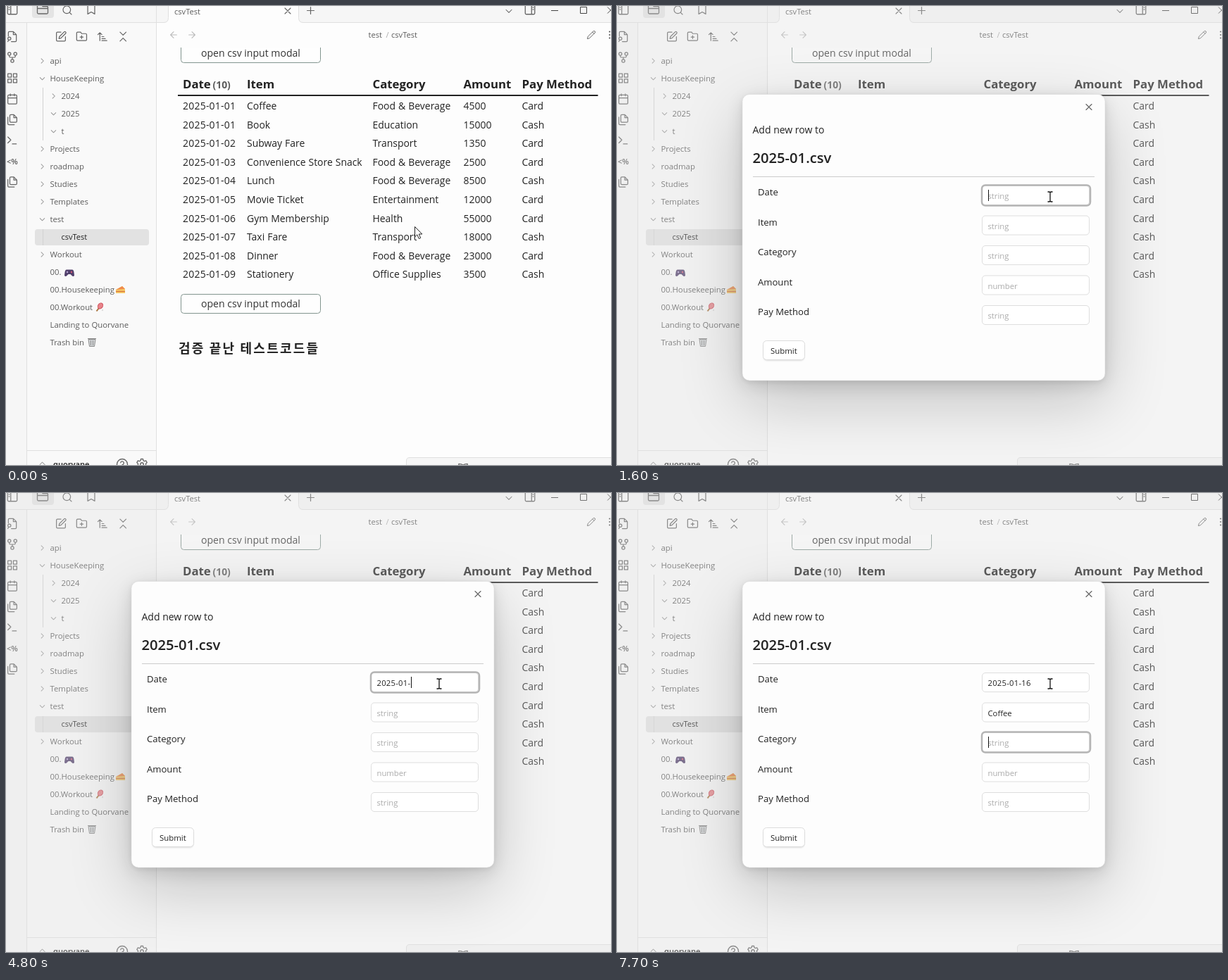
Write an HTML page that moves like this. It is 859 by 652 pixels and loops after 8 s.

```html
<!DOCTYPE html>
<html lang="en">
<head>
<meta charset="utf-8">
<title>CSV input modal</title>
<style>
html, body { margin: 0; width: 100%; height: 100%; overflow: hidden; background: #fdfdfd; }
svg { display: block; width: 859px; height: 652px; }
text { font-family: "Open Sans", "Noto Sans", sans-serif; fill: #222; white-space: pre; }
.side { font-size: 11.35px; fill: #5c5c5c; }
.nav { font-size: 11.1px; fill: #5c5c5c; }
.cell { font-size: 13.95px; word-spacing: .4px; }
.date { font-size: 13.95px; letter-spacing: .25px; }
.head { font-size: 16.8px; font-weight: 700; }
.count { font-size: 13.9px; font-weight: 700; fill: #5c5c5c; }
.btn { font-size: 14.05px; fill: #333; }
.title { font: 700 18px "Noto Sans CJK KR", "Noto Sans CJK", sans-serif; letter-spacing: 2.2px; }
.lead { font-size: 14px; font-weight: 500; }
.file { font-size: 20.2px; font-weight: 600; }
.label { font-size: 13.1px; }
.input { font-size: 11.25px; }
.submit { font-size: 11.4px; }
.icon { fill: none; stroke: #666; stroke-width: 1.75; stroke-linecap: round; stroke-linejoin: round; }
.line { fill: none; stroke: #e0e0e0; }
</style>
</head>
<body>
<svg id="stage" viewBox="0 0 859 652" xmlns="http://www.w3.org/2000/svg"></svg>
<script>
const stage = document.getElementById('stage');
const LOOP = 8000, STEP = 100, OPEN = 600;

const text = (x, y, cls, s, extra = '') => `<text x="${x}" y="${Math.round(y)}" class="${cls}" ${extra}>${s}</text>`;
const rect = (x, y, w, h, fill, extra = '') => `<rect x="${x}" y="${y}" width="${w}" height="${h}" fill="${fill}" ${extra}/>`;
const line = (d, extra = '') => `<path class="line" d="${d}" ${extra}/>`;
const icon = (x, y, d, size = 16, extra = '') =>
  `<path class="icon" transform="translate(${x - size / 2} ${y - size / 2}) scale(${size / 24})" d="${d}" ${extra}/>`;

// Icon outlines on a 24-unit grid
const I = {
  panel: 'M5 3h14a2 2 0 0 1 2 2v14a2 2 0 0 1-2 2H5a2 2 0 0 1-2-2V5a2 2 0 0 1 2-2zM9 3v18M5.5 8h1M5.5 12h1',
  panelRight: 'M5 3h14a2 2 0 0 1 2 2v14a2 2 0 0 1-2 2H5a2 2 0 0 1-2-2V5a2 2 0 0 1 2-2zM15 3v18M17.5 8h1M17.5 12h1',
  folder: 'M4 20h16a2 2 0 0 0 2-2V8a2 2 0 0 0-2-2h-8l-2-3H4a2 2 0 0 0-2 2v13a2 2 0 0 0 2 2zM2 10h20',
  folderPlus: 'M4 20h16a2 2 0 0 0 2-2V8a2 2 0 0 0-2-2h-8l-2-3H4a2 2 0 0 0-2 2v13a2 2 0 0 0 2 2zM12 10v6M9 13h6',
  search: 'M19 11a8 8 0 1 1-16 0a8 8 0 1 1 16 0M21 21l-4.3-4.3',
  bookmark: 'M19 21l-7-4-7 4V5a2 2 0 0 1 2-2h10a2 2 0 0 1 2 2z',
  edit: 'M12 3H5a2 2 0 0 0-2 2v14a2 2 0 0 0 2 2h14a2 2 0 0 0 2-2v-7M18.4 2.6a2.1 2.1 0 0 1 3 3L12 15l-4 1 1-4z',
  pencil: 'M17 3a2.8 2.8 0 1 1 4 4L7.5 20.5 2 22l1.5-5.5zM15 5l4 4',
  sort: 'M3 8l4-4 4 4M7 4v16M11 12h4M11 16h7M11 20h10',
  collapse: 'M6 3l6 6 6-6M6 21l6-6 6 6',
  fileSearch: 'M14 2v6h6M4 11V4a2 2 0 0 1 2-2h8l6 6v12a2 2 0 0 1-2 2H10M9 16a3 3 0 1 1-6 0a3 3 0 1 1 6 0M3 22l1.5-3',
  fork: 'M9 5a3 3 0 1 1-6 0a3 3 0 1 1 6 0M21 5a3 3 0 1 1-6 0a3 3 0 1 1 6 0M15 19a3 3 0 1 1-6 0a3 3 0 1 1 6 0M18 8v2q0 2-2 2H8q-2 0-2-2V8M12 12v4',
  grid: 'M3 3h7v7H3zM14 3h7v7h-7zM14 14h7v7h-7zM3 14h7v7H3z',
  calendar: 'M5 4h14a2 2 0 0 1 2 2v14a2 2 0 0 1-2 2H5a2 2 0 0 1-2-2V6a2 2 0 0 1 2-2zM3 10h18M8 2v4M16 2v4',
  copy: 'M15 2H9a2 2 0 0 0-2 2v11a2 2 0 0 0 2 2h10a2 2 0 0 0 2-2V8zM15 2v6h6M3 7v13a2 2 0 0 0 2 2h11',
  terminal: 'M3 17l6-6-6-6M12 19h8',
  help: 'M22 12a10 10 0 1 1-20 0a10 10 0 1 1 20 0M9 9a3 3 0 0 1 6 1c0 2-3 3-3 3M12 17v.1',
  gear: 'M15 12a3 3 0 1 1-6 0a3 3 0 1 1 6 0M10 2h4l.6 3 2.2 1.2 2.8-1 2 3.5-2.2 2v2.6l2.2 2-2 3.5-2.8-1-2.2 1.2L14 22h-4l-.6-3-2.2-1.2-2.8 1-2-3.5 2.2-2v-2.6l-2.2-2 2-3.5 2.8 1L9.4 5z',
  book: 'M12 7v14M12 6c-2-2-5-3-10-3v15c5 0 8 1 10 3 2-2 5-3 10-3V3c-5 0-8 1-10 3z',
  x: 'M18 6L6 18M6 6l12 12',
  plus: 'M5 12h14M12 5v14',
  left: 'M12 19l-7-7 7-7M19 12H5',
  right: 'M12 5l7 7-7 7M5 12h14',
  open: 'M5 9l7 7 7-7',
  closed: 'M9 5l7 7-7 7',
  up: 'M5 15l7-7 7 7'
};

function chrome() {
  const ribbon = ['fileSearch', 'fork', 'grid', 'calendar', 'copy', 'terminal', '', 'copy'];
  return rect(0, 0, 859, 652, '#fdfdfd') + rect(0, 0, 859, 24, '#f6f6f6') +
    rect(0, 24, 30, 628, '#f6f6f6') + rect(30, 24, 184, 628, '#f9f9f9') +
    line('M0 23.5H224M422 23.5H859M29.5 24V652M213.5 0V652M30 631.5H213') +
    '<path d="M224 24q6.5-.5 6.5-7V-2H415.5V17q0 6.5 6.5 7z" fill="#fdfdfd"/>' +
    line('M224 23.5q6.5 0 6.5-7V-2M415.5-2V16.5q0 7 6.5 7') +
    rect(37, -8, 31, 25, '#e4e4e4', 'rx="4"') +
    icon(9, 5, I.panel, 18) + icon(52, 5, I.folder, 18) + icon(87, 6, I.search, 16) + icon(121, 5, I.bookmark, 17) +
    text(239, 12, 'nav', 'csvTest') + icon(400, 7, I.x) + icon(432.5, 6.5, I.plus, 17) +
    icon(714, 7, I.open, 14) + icon(744, 5, I.panelRight, 18) +
    '<path d="M774 6.5h10M815.5 1.5h9v9h-9zM854 1.5l9 9M854 10.5l9-9" fill="none" stroke="#444"/>' +
    icon(238, 41, I.left, 15, 'style="stroke:#bbb"') + icon(264, 41, I.right, 15, 'style="stroke:#bbb"') +
    text(514.5, 45, 'nav', 'test') + text(539.5, 45, 'nav', '/', 'style="fill:#aaa"') +
    text(547, 45, 'nav', 'csvTest') + icon(831, 41, I.pencil, 13.5) +
    [36.5, 41, 45.5].map(y => `<circle cx="857" cy="${y}" r="1.1" fill="#5c5c5c"/>`).join('') +
    ['edit', 'folderPlus', 'sort', 'collapse'].map((n, i) => icon(78 + i * 29.4, 43.5, I[n], 17)).join('') +
    ribbon.map((n, i) => n ? icon(9, 43.5 + i * 29.5, I[n], 17) : '').join('') +
    text(1, 225, 'nav', '&lt;%', 'style="font-weight:600"') +
    icon(51.5, 650, I.up, 12) + text(67, 655, 'nav', 'quorvane', 'style="font-weight:600;fill:#222"') +
    icon(165, 651, I.help, 18) + icon(193, 651, I.gear, 18) +
    '<path d="M568.5 654V646q0-4.5 4.5-4.5H861V654z" fill="#f6f6f6" stroke="#e0e0e0"/>' + icon(649, 656, I.book, 15);
}

function tree() {
  // kind: > closed, v open, - note; a leading space nests the entry
  const rows = ['>api', 'vHouseKeeping', ' >2024', ' v2025', ' vt', '>Projects', '>roadmap', '>Studies', '>Templates',
    'vtest', ' -csvTest', '>Workout', '-00.', '-00.Housekeeping', '-00.Workout', '-Landing to Quorvane', '-Trash bin'];
  let out = rect(41, 317, 162, 23, '#e2e2e2', 'rx="4"') + line('M52.5 116V191M52.5 317V340', 'style="stroke:#d2d2d2"');
  rows.forEach((row, i) => {
    const deep = row[0] === ' ', s = row.trim(), y = 78 + i * 25;
    const mark = { '>': I.closed, v: I.open }[s[0]];
    if (mark) out += icon(deep ? 67.5 : 51.5, y, mark, 11, 'style="stroke:#999;stroke-width:2.2"');
    out += text(deep ? 78.5 : 62.5, y + 4, 'side', s.slice(1), s === '-csvTest' ? 'style="fill:#222;font-size:11px"' : '');
  });
  return out +
    '<path d="M86 374.5h8q2 0 2.5 4l.5 4q-1 3-4 0l-1.5-1.5h-3L87 382.5q-3 3-4 0l.5-4q.5-4 2.5-4z" fill="#51406b"/>' +
    '<circle cx="87" cy="378" r="1.2" fill="#b9a6d6"/><circle cx="93" cy="378" r="1.2" fill="#d05a78"/>' +
    '<path d="M156 403l9-5 4 4v6h-13z" fill="#f8cf6a"/><path d="M156 403l9-5 4 4z" fill="#f08a4b"/><path d="M156 405.5h13" stroke="#d9773c" stroke-width="1.5"/>' +
    '<path d="M132 429l-3.5 4.5" stroke="#a8743d" stroke-width="2"/><ellipse cx="134" cy="426" rx="3.3" ry="4.3" fill="#e8848a" stroke="#cf5560" transform="rotate(35 134 426)"/><circle cx="137" cy="432" r="1.2" fill="#ddd"/>' +
    '<path d="M117 473.5h10l-1.5 10h-7z" fill="#d2d5d7" stroke="#8a8a8a"/><path d="M116 472.5h12M120.5 475v7M123.5 475v7" stroke="#8a8a8a"/>';
}

function button(y, id) {
  return `<g id="${id}">` +
    rect(250, y + 4, 201, 27, '#000', `id="${id}Shadow" rx="4" opacity="0" style="filter:blur(3px)"`) +
    rect(248.5, y + .5, 198, 27, '#fefefe', 'rx="4" stroke="#82958f"') +
    text(277, y + 19, 'btn', 'open csv input modal') + '</g>';
}

function table() {
  const cols = [251, 342, 520.5, 649.5, 732.5];
  const heads = ['Date', 'Item', 'Category', 'Amount', 'Pay Method'];
  const rows = `01|Coffee|Food &amp; Beverage|4500|Card
01|Book|Education|15000|Cash
02|Subway Fare|Transport|1350|Card
03|Convenience Store Snack|Food &amp; Beverage|2500|Card
04|Lunch|Food &amp; Beverage|8500|Cash
05|Movie Ticket|Entertainment|12000|Card
06|Gym Membership|Health|55000|Card
07|Taxi Fare|Transport|18000|Cash
08|Dinner|Food &amp; Beverage|23000|Card
09|Stationery|Office Supplies|3500|Cash`.split('\n');
  return heads.map((h, i) => text(cols[i], 117, 'head', h)).join('') + text(293.5, 117, 'count', '(10)') +
    rect(244, 126, 596.5, 2, '#222') +
    rows.map((row, r) => row.split('|').map((s, c) =>
      text(cols[c], 147 + r * 26.6, c ? 'cell' : 'date', c ? s : '2025-01-' + s)).join('')).join('');
}

const ROW = 42.5;
function modal() {
  const shadow = (dy, blur, a) => rect(178, 125.5 + dy, 515, 406.5, '#000', `rx="10" opacity="${a}" style="filter:blur(${blur}px)"`);
  return rect(0, 0, 859, 652, '#dcdcdc', 'opacity=".3"') +
    shadow(30, 45, .2) + shadow(6.3, 12.3, .112) + shadow(1.8, 3.6, .071) +
    rect(178, 125.5, 515, 406.5, '#fdfdfd', 'rx="10" stroke="#d8d8d8" stroke-width=".5"') +
    icon(670, 143.5, I.x, 16) +
    text(192.5, 181, 'lead', 'Add new row to') + text(192.5, 223, 'file', '2025-01.csv') +
    line('M193 242.5H678', 'style="stroke:#ccc"') +
    ['Date', 'Item', 'Category', 'Amount', 'Pay Method'].map((s, i) => {
      const y = 255 + i * ROW;
      return text(200, y + 14, 'label', s) +
        rect(518.5, y + .5, 152, 27, '#fff', 'rx="4.5" stroke="#dedede"') +
        rect(518, y - .5, 154, 29, 'none', `id="ring${i}" rx="5" stroke="#b5b5b5" stroke-width="2.5" opacity="0"`) +
        text(526.5, y + 19, 'input', i === 3 ? 'number' : 'string', `id="val${i}" style="fill:#aaa"`);
    }).join('') +
    '<path id="caret" d="M.5 0v16" stroke="#111"/>' +
    rect(208, 477, 58, 27, '#000', 'rx="5" opacity=".12" style="filter:blur(1px)"') +
    rect(207.5, 475.5, 59, 27, '#fff', 'rx="5" stroke="#dcdcdc"') + text(218, 494, 'submit', 'Submit');
}

stage.innerHTML = '<clipPath id="view"><rect x="214" y="59" width="645" height="593"/></clipPath>' +
  chrome() + tree() +
  `<g clip-path="url(#view)">${button(53, 'top')}${table()}${button(409, 'low')}</g>` +
  text(245, 493, 'title', '검증 끝난 테스트코드들') +
  `<g id="modal">${modal()}</g>` +
  '<path id="arrow" d="M.5 .5V15l3.3-3.2L6.3 17.5l2.4-1L6.3 11H10.8z" fill="#fff" stroke="#222"/>' +
  '<path id="beam" d="M-3.5-7h2.5l1 1 1-1h2.5M0-6V6M-3.5 7h2.5l1-1 1 1h2.5" fill="none" stroke="#111" stroke-width="1.3"/>';

const $ = id => document.getElementById(id);
const set = (id, attrs) => { for (const k in attrs) $(id).setAttribute(k, attrs[k]); };
const clamp = v => Math.min(1, Math.max(0, v));

const fields = [
  { focus: OPEN, word: '2025-01-16', keys: [1900, 2100, 2200, 2600, 2700, 3400, 3500, 4800, 5000, 5200] },
  { focus: 5400, word: 'Coffee', keys: [5800, 6200, 6300, 6500, 6600, 7100] },
  { focus: 7600, word: '', keys: [] }
];

// Pointer stops: time, x, y
const track = [[0, 580, 313], [100, 562, 322], [300, 468, 369], [500, 378, 427], [600, 378, 427],
  [700, 402, 413], [800, 510, 346], [900, 600, 287], [1000, 610, 279], [1100, 614, 273], [1200, 615, 271]];

function pointer(t) {
  const i = track.findIndex(p => p[0] > t);
  if (i < 0) return track[track.length - 1].slice(1);
  const a = track[i - 1], b = track[i], k = (t - a[0]) / (b[0] - a[0]);
  return [a[1] + (b[1] - a[1]) * k, a[2] + (b[2] - a[2]) * k];
}

function typing(t) {
  fields.forEach((f, i) => {
    const end = fields[i + 1] ? fields[i + 1].focus : LOOP;
    const n = f.keys.filter(k => k <= t).length, val = $('val' + i);
    val.textContent = n ? f.word.slice(0, n) : 'string';
    val.style.fill = n ? '#222' : '#aaa';
    val.style.letterSpacing = n && i === 0 ? '.25px' : '0';
    set('ring' + i, { opacity: Math.min(clamp((t - f.focus) / 100), 1 - clamp((t - end) / 100)) });
    if (t >= f.focus && t < end) {
      const last = n ? f.keys[n - 1] : f.focus;
      const x = Math.round(527 + (n ? val.getComputedTextLength() : 0));
      set('caret', { transform: `translate(${x} ${261 + i * ROW})`, opacity: (t - last) % 1000 < 500 ? 1 : 0 });
    }
  });
}

function draw(ms) {
  const t = Math.floor((ms % LOOP) / STEP) * STEP;
  const opened = t >= OPEN, hover = t >= 500 && !opened;
  $('modal').style.display = opened ? '' : 'none';
  set('low', { transform: `translate(0 ${hover ? -1 : 0})` });
  set('lowShadow', { opacity: hover ? .08 : 0 });
  const [x, y] = pointer(t), beam = t >= 1000;
  set('arrow', { transform: `translate(${x} ${y})`, opacity: beam ? 0 : 1 });
  set('beam', { transform: `translate(${x} ${y})`, opacity: beam ? 1 : 0 });
  if (opened) typing(t);
}

const start = performance.now();
function tick() {
  draw(performance.now() - start);
  requestAnimationFrame(tick);
}
tick();
</script>
</body>
</html>
```
